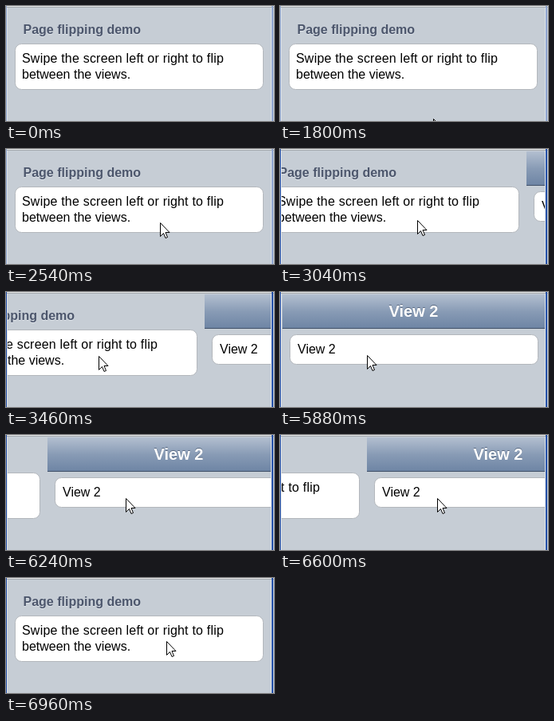
An HTML page that plays this animation: 336 by 144 pixels, repeating every 8960 ms.

```html
<!DOCTYPE html>
<html lang="en">
<head>
<meta charset="utf-8">
<title>Page flipping demo</title>
<style>
  html, body { margin: 0; width: 100%; height: 100%; overflow: hidden; }
  svg { display: block; width: 336px; height: 144px; }
  text { font-family: "Liberation Sans", Arial, sans-serif; font-size: 16px; white-space: pre; }
  .title { font-size: 20px; font-weight: bold; text-anchor: middle; fill: #fff; }
  .heading { font-weight: bold; fill: #4c566c; }
  .card { fill: #fff; stroke: #b3b7bc; }
</style>
</head>
<body>
<svg viewBox="0 0 336 144">
  <defs>
    <linearGradient id="bar" x2="0" y2="1">
      <stop offset="0" stop-color="#b3bfd0"/>
      <stop offset=".5" stop-color="#889bb5"/>
      <stop offset="1" stop-color="#6d84a4"/>
    </linearGradient>
    <clipPath id="viewport"><rect x="2" y="2" width="330" height="142"/></clipPath>
  </defs>
  <rect width="336" height="144" fill="#c6cdd5"/>
  <g clip-path="url(#viewport)">
    <g id="first">
      <text class="heading" x="21.5" y="36" style="fill:#dfe4ea">Page flipping demo</text>
      <text class="heading" x="21.5" y="35">Page flipping demo</text>
      <rect class="card" x="11.5" y="47.5" width="311" height="57" rx="8"/>
      <text x="20" y="71" letter-spacing=".2">Swipe the screen left or right to flip</text>
      <text x="20" y="91">between the views.</text>
    </g>
    <g id="second">
      <rect x="2" y="3" width="330" height="43" fill="url(#bar)"/>
      <rect x="2" y="45" width="330" height="1" fill="#3f4f68"/>
      <text class="title" x="166.5" y="30" style="fill:#5a6a82">View 2</text>
      <text class="title" x="166.5" y="31">View 2</text>
      <rect class="card" x="11.5" y="53.5" width="311" height="37" rx="8"/>
      <text x="21" y="77">View 2</text>
    </g>
  </g>
  <path d="M0 .5H336" stroke="#e6e8e8"/>
  <path d="M0 1.5H336" stroke="#a3a8ad"/>
  <path d="M1.5 2V144M332.5 2V144" stroke="#dde2e8"/>
  <path id="frame" d="M0 0H1V144H0ZM333 0H335V144H333Z"/>
  <path id="cursor" d="M.5 .5V17.5L4.5 13.5L7 19.5L9.5 18.5L7 12.5H12Z" fill="#fff" stroke="#000"/>
</svg>
<script>
const LOOP = 8960, PAGE = 330;
const el = id => document.getElementById(id);
const [first, second, frame, cursor] = ["first", "second", "frame", "cursor"].map(el);

const easeOut = p => Math.sin(p * Math.PI / 2);
const easeInOut = p => (1 - Math.cos(p * Math.PI)) / 2;
const mix = (a, b, p) => a + (b - a) * p;

// Progress in equal jumps: the first at `from`, the last at `to`.
function steps(t, from, to, count) {
  if (t < from) return 0;
  const done = Math.floor((t - from) / (to - from) * (count - 1) + 1e-6) + 1;
  return Math.min(done / count, 1);
}

const move = (node, x, y) =>
  node.setAttribute("transform", `translate(${Math.round(x)} ${Math.round(y)})`);

function draw(t) {
  const enter = easeOut(steps(t, 1800, 2540, 11));
  const dragLeft = easeInOut(steps(t, 2800, 3640, 15));
  const snapLeft = easeOut(steps(t, 3700, 3950, 4));
  const dragRight = easeInOut(steps(t, 5880, 6720, 15));
  const snapRight = easeOut(steps(t, 6780, 6960, 4));

  const left = mix(92 * dragLeft, PAGE, snapLeft);
  const right = mix(112 * dragRight, PAGE, snapRight);
  move(first, right - left, 0);
  move(second, PAGE + right - left, 0);

  cursor.style.display = t < 1800 ? "none" : "";
  move(cursor, mix(192, 193, enter) - 85 * dragLeft + 93 * dragRight, mix(149, 92, enter) - 13 * dragLeft);
  frame.setAttribute("fill", t < 2800 ? "#8fa5cf" : "#2450a8");
}

const start = performance.now();
function tick() {
  draw((performance.now() - start) % LOOP);
  requestAnimationFrame(tick);
}
draw(0);
requestAnimationFrame(tick);
</script>
</body>
</html>
```
